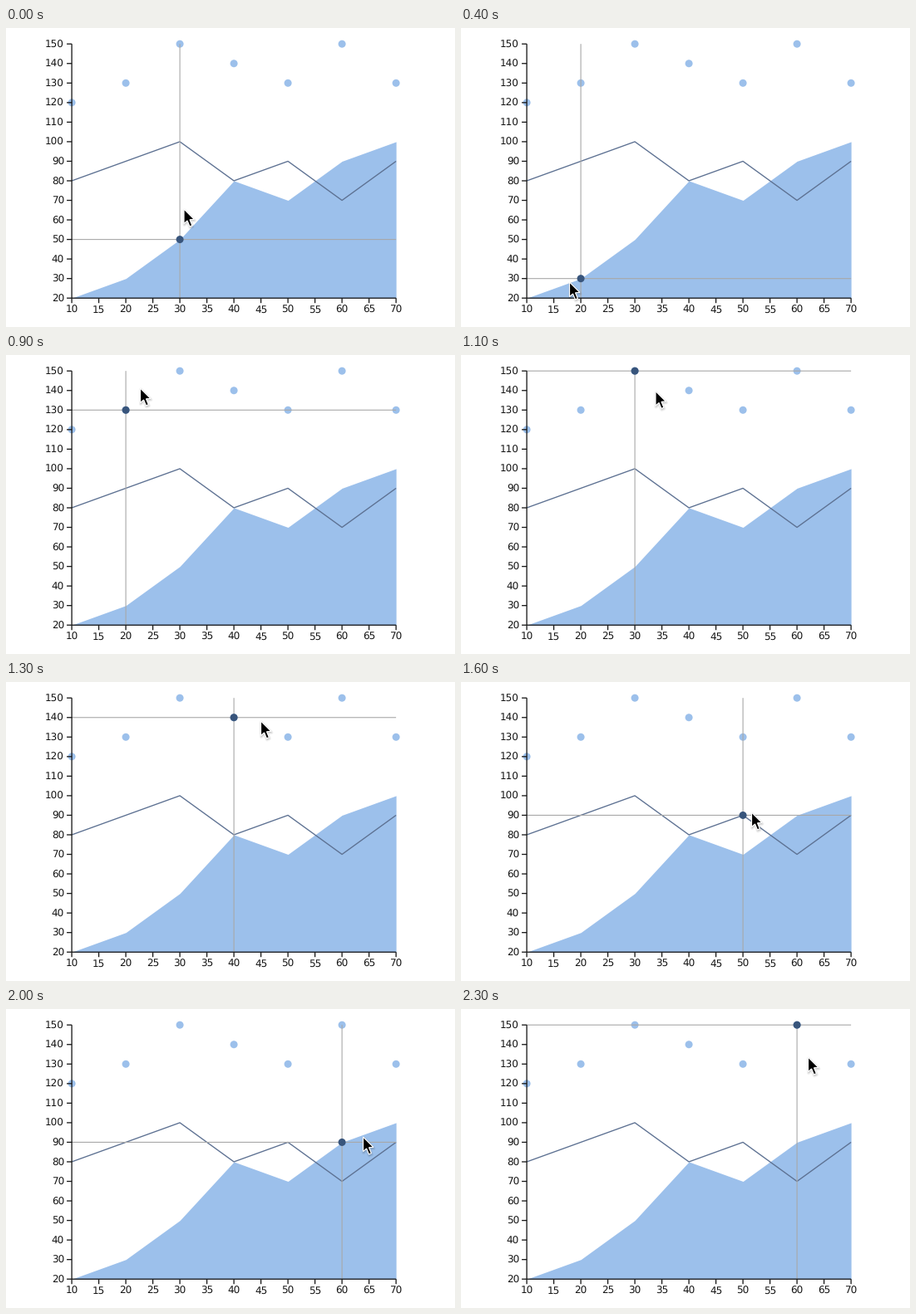
These frames come from a looping animation (540x360 px, 2400 ms). A matplotlib script:

```python
import numpy as np
import matplotlib.pyplot as plt
from matplotlib.animation import FuncAnimation
from matplotlib.patches import Circle, Polygon

W, H, DPI = 540, 360, 72
FRAMES, STEP = 24, 100
BLUE, NAVY, INK, GREY = "#9cc0eb", "#38557c", "#161616", "#a8a8a8"
LEFT, RIGHT, TOP, BOTTOM = 79.1, 469.1, 19.2, 325.2

plt.rcParams.update({"font.family": "DejaVu Sans", "font.size": 12,
                     "text.color": INK, "text.hinting": "none"})
fig = plt.figure(figsize=(W / DPI, H / DPI), dpi=DPI, facecolor="white")
ax = fig.add_axes([0, 0, 1, 1])
ax.set_xlim(0, W)
ax.set_ylim(H, 0)
ax.axis("off")


def px(v):
    return LEFT + (v - 10) * (RIGHT - LEFT) / 60


def py(v):
    return BOTTOM - (v - 20) * (BOTTOM - TOP) / 130


def rule(xs, ys, color=INK, width=1.3, z=6):
    return ax.plot(xs, ys, color=color, lw=width, zorder=z, snap=False,
                   solid_capstyle="butt")[0]


def dot(x, y, color, z):
    return ax.add_patch(Circle((x, y), 4.5, fc=color, lw=0, zorder=z))


# Data series
t = np.arange(10, 71, 10)
area = 10 * np.array([2, 3, 5, 8, 7, 9, 10])
line = 10 * np.array([8, 9, 10, 8, 9, 7, 9])
dots = 10 * np.array([12, 13, 15, 14, 13, 15, 13])

ax.fill_between(px(t), py(area), BOTTOM, color=BLUE, lw=0, zorder=1)
rule(px(t), py(line), "#5d7192", 1.35, 2)
for x, y in zip(px(t), py(dots)):
    dot(x, y, BLUE, 3)

# Axes
rule([LEFT, LEFT], [TOP, BOTTOM])
rule([LEFT, RIGHT], [BOTTOM, BOTTOM])
for v in range(20, 151, 10):
    y = py(v)
    rule([LEFT - 6, LEFT], [y, y])
    ax.text(LEFT - 9, y + 4.4, str(v), ha="right", va="baseline")
for v in range(10, 71, 5):
    x = px(v)
    rule([x, x], [BOTTOM, BOTTOM + 6])
    ax.text(x, BOTTOM + 17.7, str(v), ha="center", va="baseline")

# Crosshair and marker
vline = rule([0, 0], [TOP, BOTTOM], GREY, 1.1, 4)
hline = rule([LEFT, RIGHT], [0, 0], GREY, 1.1, 4)
marker = dot(0, 0, NAVY, 7)


def arrow_shape():
    """Half outline (along, across) mirrored about a tilted axis."""
    half = np.array([(0, 0), (16.2, 6.7), (14.5, 1.6), (22, 1.6)])
    along, across = np.vstack([half, half[:0:-1] * (1, -1)]).T
    a = np.radians(67.5)
    return np.column_stack([along * np.cos(a) - across * np.sin(a),
                            along * np.sin(a) + across * np.cos(a)])


arrow = arrow_shape()
shadows = [ax.add_patch(Polygon(arrow, fc="black", ec="black", lw=w, alpha=0.06,
                                joinstyle="round", zorder=8)) for w in (2, 4)]
pointer = ax.add_patch(Polygon(arrow, fc="black", ec="white", lw=1.2,
                               joinstyle="miter", zorder=9))

# Pointer stops: time in ms, x, y
stops = np.array([
    (0, 214, 218), (400, 130.5, 306), (700, 92, 320), (900, 161.5, 40),
    (1300, 306.5, 47), (1600, 349.5, 157), (2000, 429.5, 154),
    (2100, 461, 130), (2300, 417.5, 58),
]).T
spots = np.array([(px(x), py(y)) for s in (area, line, dots)
                  for x, y in zip(t, s)])


def draw(i):
    tip = np.array([np.interp(i * STEP, stops[0], s) for s in stops[1:]])
    # The crosshair snaps to the data point nearest the pointer.
    x, y = spots[np.argmin(np.hypot(*(spots - tip).T))]
    vline.set_xdata([x, x])
    hline.set_ydata([y, y])
    marker.center = x, y
    pointer.set_xy(arrow + tip)
    for s in shadows:
        s.set_xy(arrow + tip + (0.5, 1.5))
    return vline, hline, marker, pointer, *shadows


anim = FuncAnimation(fig, draw, frames=FRAMES, interval=STEP, repeat=True,
                     repeat_delay=0)
plt.show()
```
